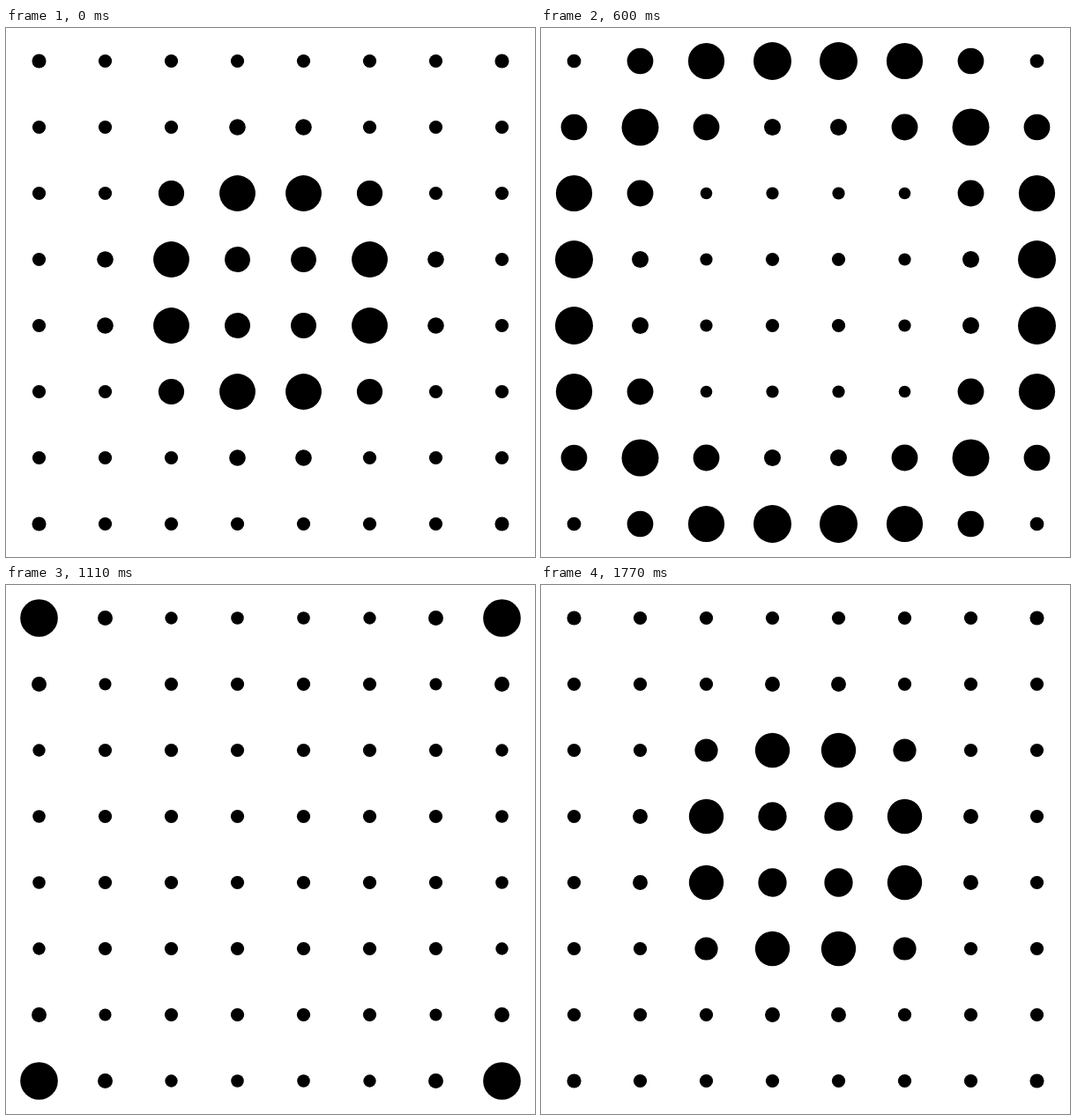
An HTML page that plays this animation: 600 px wide and 600 px high, repeating every 1800 ms.

```html
<!DOCTYPE html>
<html lang="en">
<head>
<meta charset="utf-8">
<title>Dot ripple</title>
<style>
  html, body { margin: 0; width: 100%; height: 100%; overflow: hidden; background: #fff; }
  svg { display: block; width: 100%; height: 100%; }
</style>
</head>
<body>
<svg id="stage" viewBox="0 0 600 600"></svg>
<script>
const GRID = 8, PITCH = 75, STEP_MS = 30, STEPS = 60;
const REST = 15.2;       // resting diameter
const SPEED = 0.109;     // ring speed in cells per step
const LEAD = 14;         // steps from rest to the crest

// Pulse shapes: crest diameter, steps held there, fall length, dip after it, settling time
const INNER = { top: 42, rise: LEAD, hold: 0, fall: 13, dip: 13.6, settle: 12 };
const CENTER = { ...INNER, rise: 10.5 };
const EDGE = { top: 43, rise: LEAD, hold: 1.8, fall: 10.5, dip: 14.2, settle: 12 };
const CORNER = { top: 43, rise: LEAD, hold: 3.3, fall: 13, dip: 16.4, settle: 30 };

const ease = u => (1 - Math.cos(Math.PI * Math.min(1, Math.max(0, u)))) / 2;
const mix = (a, b, u) => a + (b - a) * u;
const mod = (a, n) => ((a % n) + n) % n;

function shapeFor(x, y) {
  const near = Math.min(x, y), far = Math.max(x, y), rim = (GRID - 1) / 2;
  if (near === rim) return CORNER;
  if (far === rim) return EDGE;
  return far < 1 ? CENTER : INNER;
}

function diameter({ top, rise, hold, fall, dip, settle }, sinceCrest) {
  if (sinceCrest < 0) return mix(REST, top, ease(1 + sinceCrest / rise));
  const falling = sinceCrest - hold;
  if (falling < fall) return mix(top, dip, ease(falling / fall));
  return mix(dip, REST, ease((falling - fall) / settle));
}

const stage = document.getElementById("stage");
const dots = [];
for (let row = 0; row < GRID; row++) {
  for (let col = 0; col < GRID; col++) {
    const x = Math.abs(col - (GRID - 1) / 2);
    const y = Math.abs(row - (GRID - 1) / 2);
    const node = document.createElementNS("http://www.w3.org/2000/svg", "circle");
    node.setAttribute("cx", (col + 0.5) * PITCH);
    node.setAttribute("cy", (row + 0.5) * PITCH);
    stage.append(node);
    dots.push({ node, shape: shapeFor(x, y), crest: (Math.hypot(x, y) - 1.38) / SPEED });
  }
}

function draw(ms) {
  const step = Math.floor(ms / STEP_MS) % STEPS;
  for (const { node, shape, crest } of dots) {
    const sinceCrest = mod(step - crest + LEAD, STEPS) - LEAD;
    node.setAttribute("r", (diameter(shape, sinceCrest) / 2).toFixed(2));
  }
}

const start = performance.now();
function tick() {
  draw(performance.now() - start);
  requestAnimationFrame(tick);
}
tick();
</script>
</body>
</html>
```
